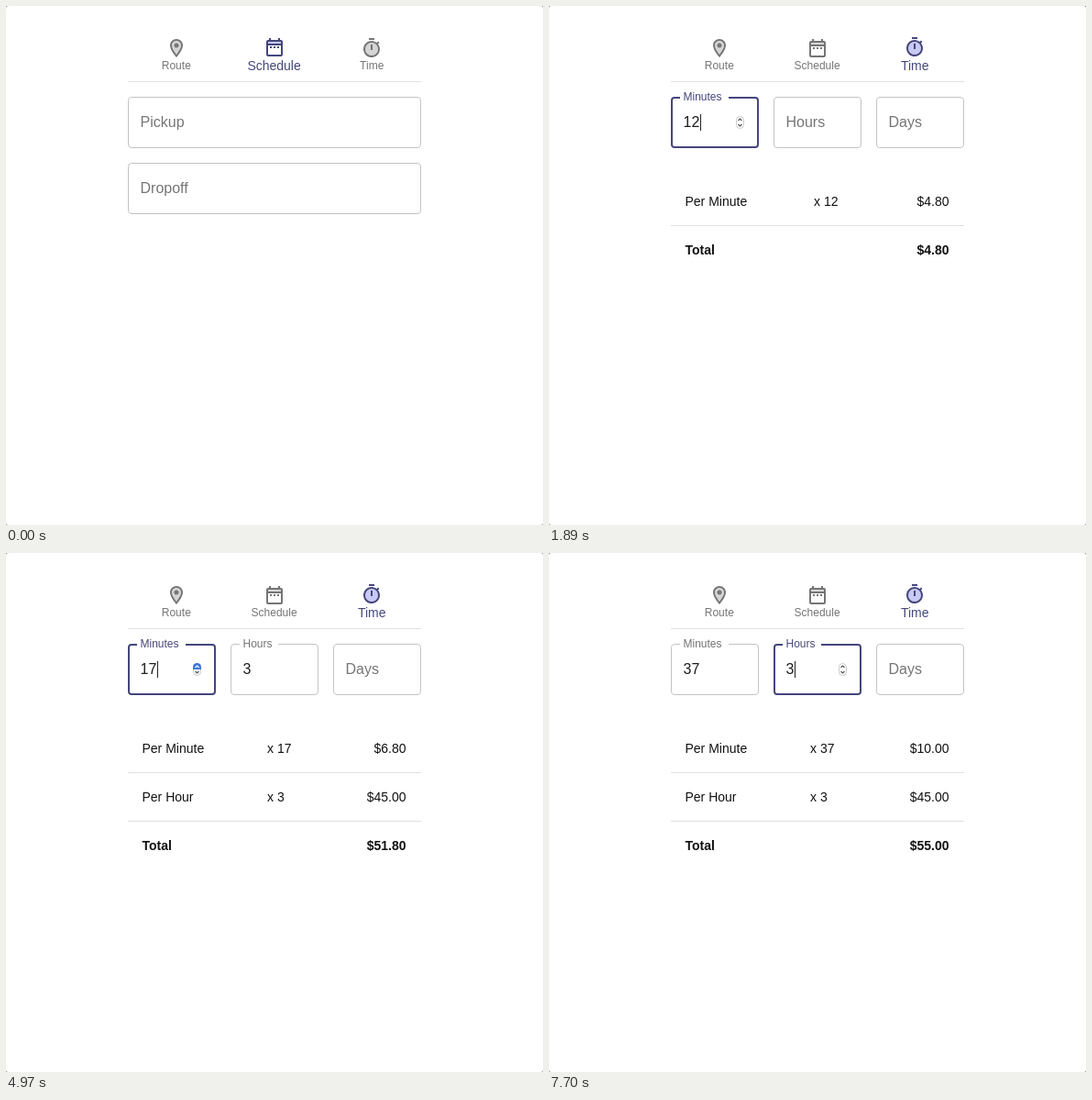
Write an HTML page that moves like this. It is 586 px wide and 566 px high and loops after 8 s.

```html
<!DOCTYPE html>
<html lang="en">
<head>
<meta charset="utf-8">
<title>Rental price form</title>
<style>
html, body { margin: 0; width: 100%; height: 100%; overflow: hidden; background: #888; }
svg { display: block; width: 586px; height: 566px; font-family: "Liberation Sans", Arial, sans-serif; }
</style>
</head>
<body>
<svg id="stage" viewBox="0 0 586 566"></svg>
<script>
const LOOP = 8000;
const SWITCH = 570;
const GREY = [117, 117, 117], BRAND = [68, 70, 124], INK = '#1c1c1c';
const SOFT_GREY = [213, 213, 213], SOFT_BRAND = [200, 201, 244];
const stage = document.getElementById('stage');

const clamp = (v, lo = 0, hi = 1) => Math.min(hi, Math.max(lo, v));
const lerp = (a, b, p) => a + (b - a) * p;
const mix = (a, b, p) => `rgb(${a.map((v, i) => Math.round(lerp(v, b[i], p)))})`;
const within = (t, spans) => spans.some(([a, b]) => t >= a && t < b);

function bezier(x1, y1, x2, y2) {
  const at = (a, b, u) => 3 * a * u * (1 - u) ** 2 + 3 * b * u * u * (1 - u) + u ** 3;
  return p => {
    if (p <= 0) return 0;
    if (p >= 1) return 1;
    let lo = 0, hi = 1;
    for (let i = 0; i < 24; i++) {
      const mid = (lo + hi) / 2;
      if (at(x1, x2, mid) < p) lo = mid; else hi = mid;
    }
    return at(y1, y2, lo);
  };
}
const easeOut = bezier(0, 0, .2, 1);
const easeInOut = bezier(.4, 0, .2, 1);
const ease = bezier(.25, .1, .25, 1);

const text = (x, y, size, fill, str, extra = '') =>
  `<text x="${x}" y="${y}" font-size="${size}" fill="${fill}" ${extra}>${str}</text>`;
const rect = (x, y, w, h, fill, extra = '') =>
  `<rect x="${x}" y="${y}" width="${w}" height="${h}" fill="${fill}" ${extra}/>`;

const TABS = [
  { name: 'Route', x: 185.8,
    soft: 'M12 4C9.2 4 7 6.2 7 9c0 2.9 2.9 7.2 5 9.9 2.1-2.7 5-7 5-9.9 0-2.8-2.2-5-5-5z',
    line: 'M12 2C8.1 2 5 5.1 5 9c0 5.3 7 13 7 13s7-7.7 7-13c0-3.9-3.1-7-7-7zM7 9c0-2.8 2.2-5 5-5s5 2.2 5 5c0 2.9-2.9 7.2-5 9.9C9.9 16.2 7 11.9 7 9zM9.5 9a2.5 2.5 0 1 0 5 0 2.5 2.5 0 1 0-5 0z' },
  { name: 'Schedule', x: 292.6,
    soft: 'M5 8h14V6H5z',
    line: 'M7 11h2v2H7zM11 11h2v2h-2zM15 11h2v2h-2zM19 4h-1V2h-2v2H8V2H6v2H5a2 2 0 0 0-2 2v14a2 2 0 0 0 2 2h14a2 2 0 0 0 2-2V6a2 2 0 0 0-2-2zM19 20H5V10h14zM19 8H5V6h14z' },
  { name: 'Time', x: 399.2,
    soft: 'M5 13a7 7 0 1 0 14 0 7 7 0 1 0-14 0z',
    line: 'M15 1H9v2h6zM11 14h2V8h-2zM19 7.4l1.4-1.4q-.6-.8-1.4-1.4l-1.4 1.4A9 9 0 1 0 19 7.4zM12 20a7 7 0 1 1 0-14 7 7 0 0 1 0 14z' }
];

function tab({ name, x, soft, line }, i, t) {
  const on = p => i === 2 ? p : i === 1 ? 1 - p : 0;
  const grow = on(ease((t - SWITCH - 100) / 200));
  const tint = on(easeInOut((t - SWITCH) / 250));
  const color = mix(GREY, BRAND, tint);
  return `<g transform="translate(${Math.round(x - 12)} ${34 - grow})" fill-rule="evenodd">
    <path d="${soft}" fill="${mix(SOFT_GREY, SOFT_BRAND, tint)}"/><path d="${line}" fill="${color}"/></g>` +
    text(x, 69 + grow, 12 + 2 * grow, color, name, 'text-anchor="middle"');
}

function ripple(t) {
  const grow = easeInOut((t - 390) / 550);
  const alpha = lerp(.1, .3, grow) * (1 - easeInOut((t - SWITCH) / 550));
  if (t < 390 || alpha <= 0) return '';
  return `<clipPath id="tab"><path d="M346 26h107v56H346z"/></clipPath>
    <circle cx="405" cy="60" r="${69.5 * grow}" fill="rgb(70,70,170)" fill-opacity="${alpha}" clip-path="url(#tab)"/>`;
}

function spinner(x, pressed) {
  const top = pressed ? `<path d="M${x - 4.5} 127v-2.5a4.5 4.5 0 0 1 9 0v2.5z" fill="#3b78dc"/>` : '';
  return rect(x - 4, 120.5, 8, 13, '#fff', 'rx="4" stroke="#c8c8c8"') + top +
    `<g fill="none" stroke-width="1.2"><path d="M${x - 2} 125l2-2 2 2" stroke="${pressed ? '#fff' : '#555'}"/>
    <path d="M${x - 2} 129l2 2 2-2" stroke="#555"/></g>`;
}

function field(name, x, y, w, t, s = {}) {
  const { shrinkAt = LOOP, focus = [], hover = [], caret = [], value = '', labelWidth = 0, pressed } = s;
  const focused = within(t, focus), hovered = within(t, hover);
  const up = easeOut((t - shrinkAt) / 200);
  const gap = labelWidth * easeOut((t - shrinkAt - 50) / 100);
  const tint = focus.reduce((sum, [a, b]) => sum + easeOut((t - a) / 200) - easeOut((t - b) / 200), 0);
  const lw = focused ? 2 : 1;
  const stroke = focused ? mix(BRAND, BRAND, 0) : hovered ? '#212121' : '#c4c4c4';
  let out = rect(x + lw / 2, y + lw / 2, w - lw, 56 - lw, 'none', `rx="${4 - lw / 2}" stroke="${stroke}" stroke-width="${lw}"`);
  if (gap > 0) out += rect(x + 10, y - 1, gap, 4, '#fff');
  out += text(x + 13.5, y + lerp(33, 4, up), lerp(16, 12, up), mix(GREY, BRAND, clamp(tint)), name);
  out += text(x + 13.5, y + 33, 16, INK, value);
  if (shrinkAt < LOOP && (focused || hovered)) out += spinner(x + 75.5, pressed);
  if (within(t, caret)) out += rect(x + 14 + Math.round(8.9 * String(value).length), y + 19, 1, 18, '#222');
  return out;
}

// The held spinner adds one every 70 ms, with three short stalls.
function minutesAt(t) {
  if (t < 1890) return 0;
  if (t < 4200) return 12;
  const k = clamp(Math.floor((t - 4970) / 70 + 1e-6), -4, 20);
  return 17 + k - ([1, 7, 19].includes(k) ? 1 : 0);
}

function table(minutes, hours) {
  if (!minutes) return '';
  const perMinute = Math.min(10, minutes * .4), perHour = hours * 15;
  const rows = [['Per Minute', 'x ' + minutes, perMinute]];
  if (hours) rows.push(['Per Hour', 'x ' + hours, perHour]);
  rows.push(['Total', '', perMinute + perHour]);
  return rows.map(([name, count, price], i) => {
    const y = 218 + 53 * i, last = i === rows.length - 1;
    const weight = last ? 'font-weight="bold"' : '';
    return text(148.5, y, 14, '#111', name, weight) +
      text(hours ? 285 : 289, y, 14, '#111', count) +
      text(436.5, y, 14, '#111', '$' + price.toFixed(2), weight + ' text-anchor="end"') +
      (last ? '' : rect(133, y + 21, 320, 1, '#e0e0e0'));
  }).join('');
}

function form(t) {
  if (t < SWITCH) return field('Pickup', 133, 99, 320, t) + field('Dropoff', 133, 171, 320, t);
  const minutes = minutesAt(t), hours = t < 3010 ? 0 : 3;
  return field('Minutes', 133, 99, 96, t, {
    shrinkAt: 1000, labelWidth: 53, value: minutes || '',
    focus: [[1000, 2500], [4190, 7570]], hover: [[3560, 4190]],
    caret: [[1000, 1540], [1890, 2450], [4190, 6930], [7420, 7570]],
    pressed: within(t, [[4200, 6370]])
  }) + field('Hours', 245, 99, 96, t, {
    shrinkAt: 2500, labelWidth: 42, value: hours || '',
    focus: [[2500, 4190], [7570, 9000]], hover: [[7120, 7570]],
    caret: [[2500, 3500], [4060, 4190], [7570, 9000]]
  }) + field('Days', 357, 99, 96, t, { hover: [[3010, 3290], [6580, 7070]] }) + table(minutes, hours);
}

function render(t) {
  stage.innerHTML = rect(0, 0, 586, 566, '#fff', 'rx="2.5"') + ripple(t) +
    TABS.map((item, i) => tab(item, i, t)).join('') +
    rect(133, 82, 320, 1, '#e0e0e0') + form(t);
}

const start = performance.now();
function frame() {
  render((performance.now() - start) % LOOP);
  requestAnimationFrame(frame);
}
frame();
</script>
</body>
</html>
```
